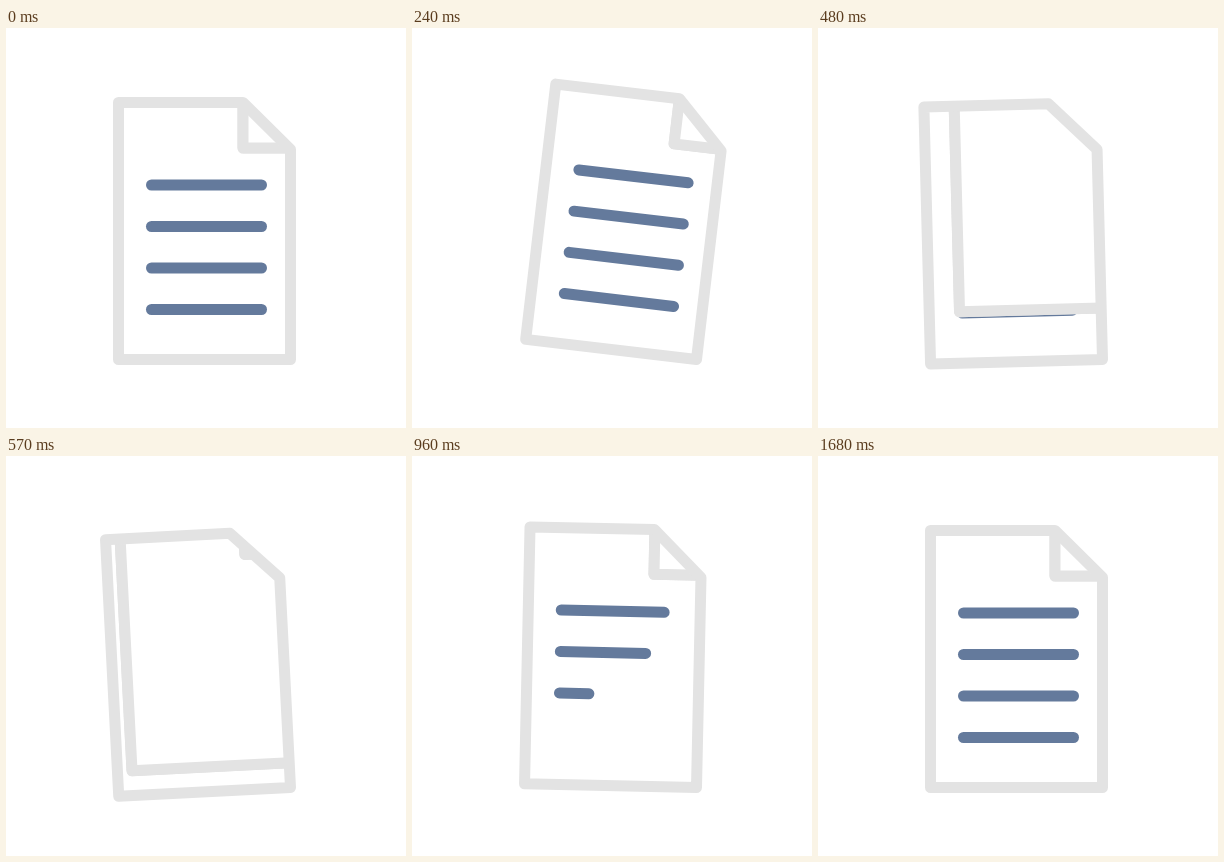
Write an HTML page with a canvas that moves like this. It is 400 px wide and 400 px high and loops after 2.4 s.

```html
<!DOCTYPE html>
<html lang="en">
<head>
<meta charset="utf-8">
<title>Page turn</title>
<style>
html, body { margin: 0; width: 100%; height: 100%; overflow: hidden; background: #fff; }
canvas { display: block; width: 100%; height: 100%; }
</style>
</head>
<body>
<canvas id="stage" width="400" height="400"></canvas>
<script>
const ctx = document.getElementById('stage').getContext('2d');
const LOOP = 2400, STEP = 30;
const GRAY = '#e3e3e3', BLUE = '#647a9c';
const LEFT = 112.5, TOP = 74.5, RIGHT = 284.5, BOTTOM = 331.5;
const FOLD = { x: 237, y: 120 };
const LINE = { x: 145.5, y: 157, gap: 41.5, length: 110 };

// Swing of the sheet around its bottom right corner: [ms, degrees]
const SWING = [[0, 0], [275, 7], [550, -3], [840, 2], [1120, 0]];

const page = new Path2D();
page.moveTo(LEFT, TOP);
page.lineTo(FOLD.x, TOP);
page.lineTo(RIGHT, 121.5);
page.lineTo(RIGHT, BOTTOM);
page.lineTo(LEFT, BOTTOM);
page.closePath();

// Exponential ease-out, 0 before the start and 1 at the end
function easeOut(t, start) {
  const span = 610, tau = 130;
  const x = Math.min(Math.max(t - start, 0), span);
  return (1 - Math.exp(-x / tau)) / (1 - Math.exp(-span / tau));
}

function swingAngle(t) {
  for (let i = 1; i < SWING.length; i++) {
    const [t0, a0] = SWING[i - 1], [t1, a1] = SWING[i];
    if (t < t1) {
      const k = (1 - Math.cos(Math.PI * (t - t0) / (t1 - t0))) / 2;
      return (a0 + (a1 - a0) * k) * Math.PI / 180;
    }
  }
  return 0;
}

// k = 0 is the resting dog-ear, k = 1 the whole sheet turned over
function drawFold(k) {
  const x = FOLD.x + (LEFT - FOLD.x) * k;
  const y = FOLD.y + (BOTTOM - FOLD.y) * k;
  ctx.save();
  ctx.clip(page);
  ctx.beginPath();
  ctx.moveTo(x, Math.min(TOP, y - 60));
  ctx.lineTo(x, y);
  ctx.lineTo(Math.max(RIGHT, x + 60), y);
  ctx.strokeStyle = GRAY;
  ctx.stroke();
  ctx.lineTo(RIGHT + 60, TOP - 60);
  ctx.closePath();
  ctx.fillStyle = '#fff';
  ctx.fill();
  ctx.beginPath();
  ctx.moveTo(x, Math.min(TOP, y - 60));
  ctx.lineTo(x, y);
  ctx.lineTo(Math.max(RIGHT, x + 60), y);
  ctx.stroke();
  ctx.restore();
}

function drawLines(amount) {
  ctx.strokeStyle = BLUE;
  for (let i = 0; i < 4; i++) {
    const k = amount(i);
    if (k <= 0) continue;
    const y = LINE.y + i * LINE.gap;
    ctx.beginPath();
    ctx.moveTo(LINE.x, y);
    ctx.lineTo(LINE.x + LINE.length * k, y);
    ctx.stroke();
  }
}

function draw(t) {
  ctx.setTransform(1, 0, 0, 1, 0, 0);
  ctx.fillStyle = '#fff';
  ctx.fillRect(0, 0, 400, 400);
  ctx.translate(RIGHT, BOTTOM);
  ctx.rotate(swingAngle(t));
  ctx.translate(-RIGHT, -BOTTOM);
  ctx.lineWidth = 11;
  ctx.lineCap = ctx.lineJoin = 'round';

  const turn = easeOut(t, 300);
  if (t < 620) drawLines(() => 1);
  if (turn < 1) drawFold(turn);
  if (t >= 620) drawLines(i => easeOut(t, 620 + 150 * i));
  if (t > 470) drawFold(-0.243 * (1 - easeOut(t, 470)));

  ctx.strokeStyle = GRAY;
  ctx.stroke(page);
}

const begin = performance.now();
function tick() {
  const t = (performance.now() - begin) % LOOP;
  draw(Math.floor(t / STEP) * STEP);
  requestAnimationFrame(tick);
}
tick();
</script>
</body>
</html>
```
